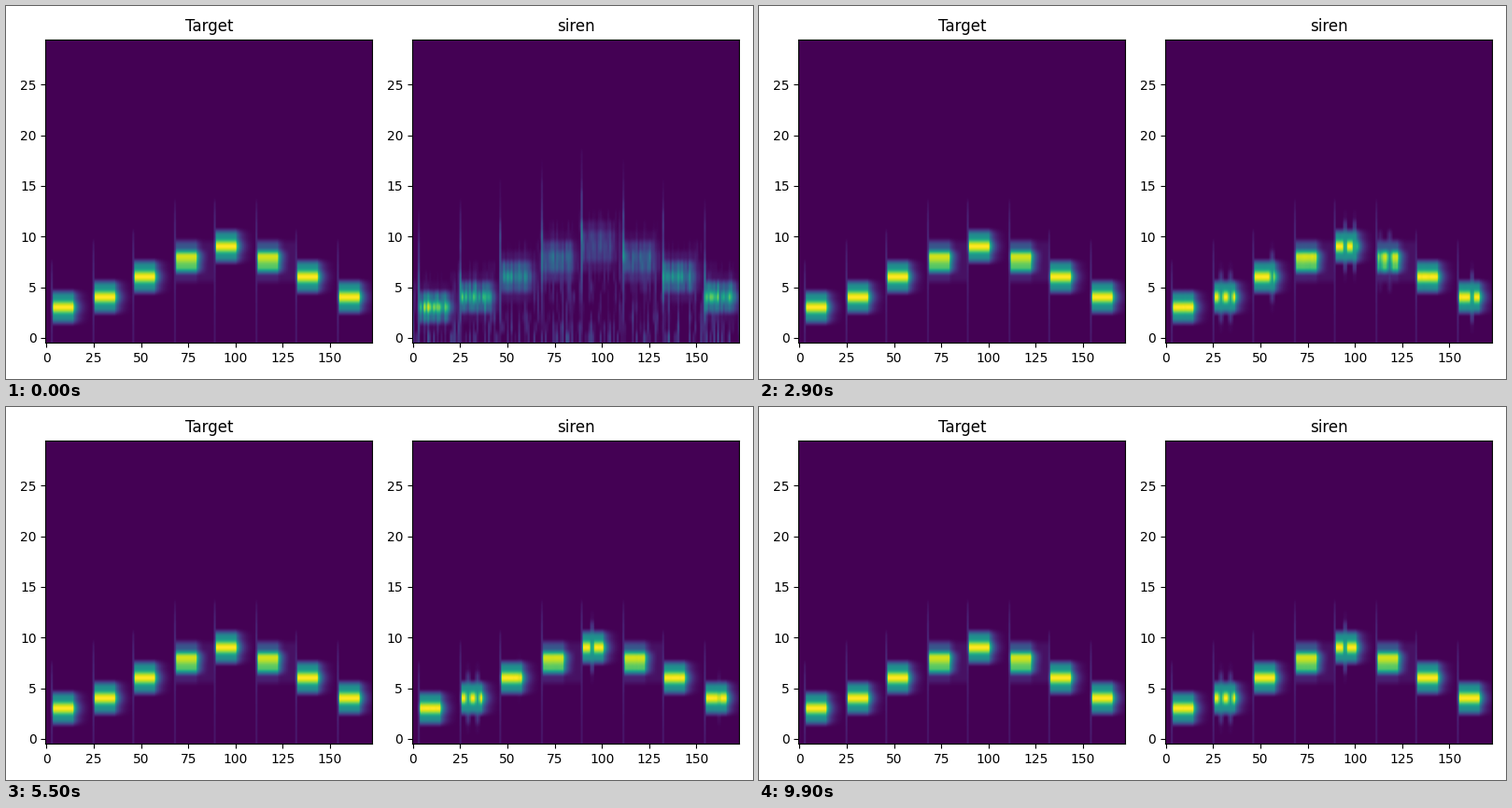
Animation, 800 px wide and 400 px high, one loop 10 s. Source, as a matplotlib script:

```python
import numpy as np
import matplotlib.pyplot as plt
from matplotlib.animation import FuncAnimation

ROWS, COLS = 30, 173
FRAMES, INTERVAL = 100, 100
HOLD = 11

row = np.arange(ROWS)[:, None]
col = np.arange(COLS)[None, :]

# Eight notes rise and fall, evenly spaced in time
RISE = [3.0, 4.0, 6.0, 7.67, 9.0]
PITCH = np.array(RISE + RISE[-2:0:-1])
ONSET = np.ceil(4 + 21.5 * np.arange(len(PITCH)))

# Columns that are learned late or never
STUCK = [29, 34, 94.5]
SLOW = {56: 56, 99.5: 45, 113: 38, 118: 46, 161.5: 58}


def owner(c):
    """Index of the note sounding at column c."""
    return np.clip(np.searchsorted(ONSET, c + 2, side="right") - 1, 0, None)


def lobe(pitch):
    """Main lobe of a Hann window sampled at every frequency bin."""
    d = np.abs(row - pitch)
    d = np.where(np.abs(d - 1) < 1e-6, 1 + 1e-6, d)
    return np.where(d < 2, np.sinc(d) / (1 - d * d), 0)


def envelope(start, hold):
    k = col - start
    tail = np.clip(0.65 * np.exp(-(k - hold) / 2.6) - 0.015, 0, 1)
    env = np.where(k < hold, 1.0, tail)
    return np.where(k < -1, 0.0, np.where(k == -1, 0.2, env))


def click(pitch, start, reach, level):
    """Thin broadband line just before a note."""
    d = row - pitch
    up = np.clip(1 - (d / reach) ** 2, 0, 1) ** 0.6
    down = 0.45 + 0.55 * np.exp(np.minimum(d, 0) / 3)
    return level * np.where(d > 0, up, down) * (col == start - 1)


def make_clean():
    out = np.zeros((ROWS, COLS))
    for k, (pitch, start) in enumerate(zip(PITCH, ONSET)):
        body = lobe(pitch) * envelope(start, HOLD)
        line = click(pitch, start, 4.8 + 1.1 * (k % 2), 0.12)
        # Pitches between two bins leave a faint halo
        leak = 0.14 * abs(pitch - round(pitch))
        halo = leak * (np.abs(row - pitch) < 2) * (np.abs(col - start - 10) <= 9)
        out = np.maximum.reduce([out, body, line, halo])
    return out


def make_rough(rng):
    """Untrained output: weak, speckled notes over a low noise floor."""
    u = rng.random((ROWS + 1, COLS))
    u = (u[1:] + u[:-1]) / 2
    streak = 0.6 * u + 0.4 * rng.random((1, COLS))
    below = np.clip((PITCH[owner(col)] + 4 - row) / 3, 0, 1)
    out = 0.35 * np.clip(streak - 0.45, 0, 1) * below * (1 + np.exp(-row))
    for pitch, start in zip(PITCH, ONSET):
        spread = 0.1 * pitch
        wide = (lobe(pitch - spread) + lobe(pitch + spread)) / 2
        peak = 1.2 - 0.085 * pitch
        body = peak * wide * envelope(start, HOLD + 4) * (0.35 + 0.9 * streak)
        line = click(pitch, start, 9.8, 0.5)
        line = line * np.exp(-np.abs(row - pitch) / 5) * (0.5 + u)
        out = np.maximum.reduce([out, body, line])
    return out


def add_gap(img, c, amount):
    """Weaken one column of a note and spill its energy to the sides."""
    d = np.abs(row - PITCH[owner(c)])
    shape = amount * np.exp(-((col - c) / 1.1) ** 4)
    spill = 0.16 * np.exp(-((d - 2) / 0.7) ** 2)
    return np.maximum(img * (1 - 0.4 * shape * (d < 0.9)), spill * shape)


CLEAN = make_clean()


def predict(i):
    rng = np.random.default_rng(11 + i)
    w = np.exp(-i / (1.2 + 0.27 * PITCH[owner(col)]))
    img = CLEAN * (1 - w) + make_rough(rng) * w
    grow = 1 - np.exp(-i / 3)
    for c in STUCK:
        img = add_gap(img, c, grow)
    for c, last in SLOW.items():
        img = add_gap(img, c, grow * np.clip((last - i) / 15, 0, 1))
    jitter = rng.normal(0, 0.02 * np.exp(-i / 30), img.shape)
    return np.clip(img * (1 + jitter), 0, 1)


fig, axes = plt.subplots(1, 2, figsize=(8, 4), dpi=100)
panels = []
for ax, title, data in zip(axes, ("Target", "siren"), (CLEAN, predict(0))):
    panels.append(ax.imshow(data, origin="lower", aspect="auto",
                            cmap="viridis", vmin=0, vmax=1))
    ax.set_title(title)
fig.tight_layout()
fig.subplots_adjust(top=1 - 35.5 / 400)


def update(i):
    panels[1].set_data(predict(i))
    return panels[1:]


anim = FuncAnimation(fig, update, frames=FRAMES, interval=INTERVAL,
                     repeat=True, repeat_delay=0, blit=False)
plt.show()
```
